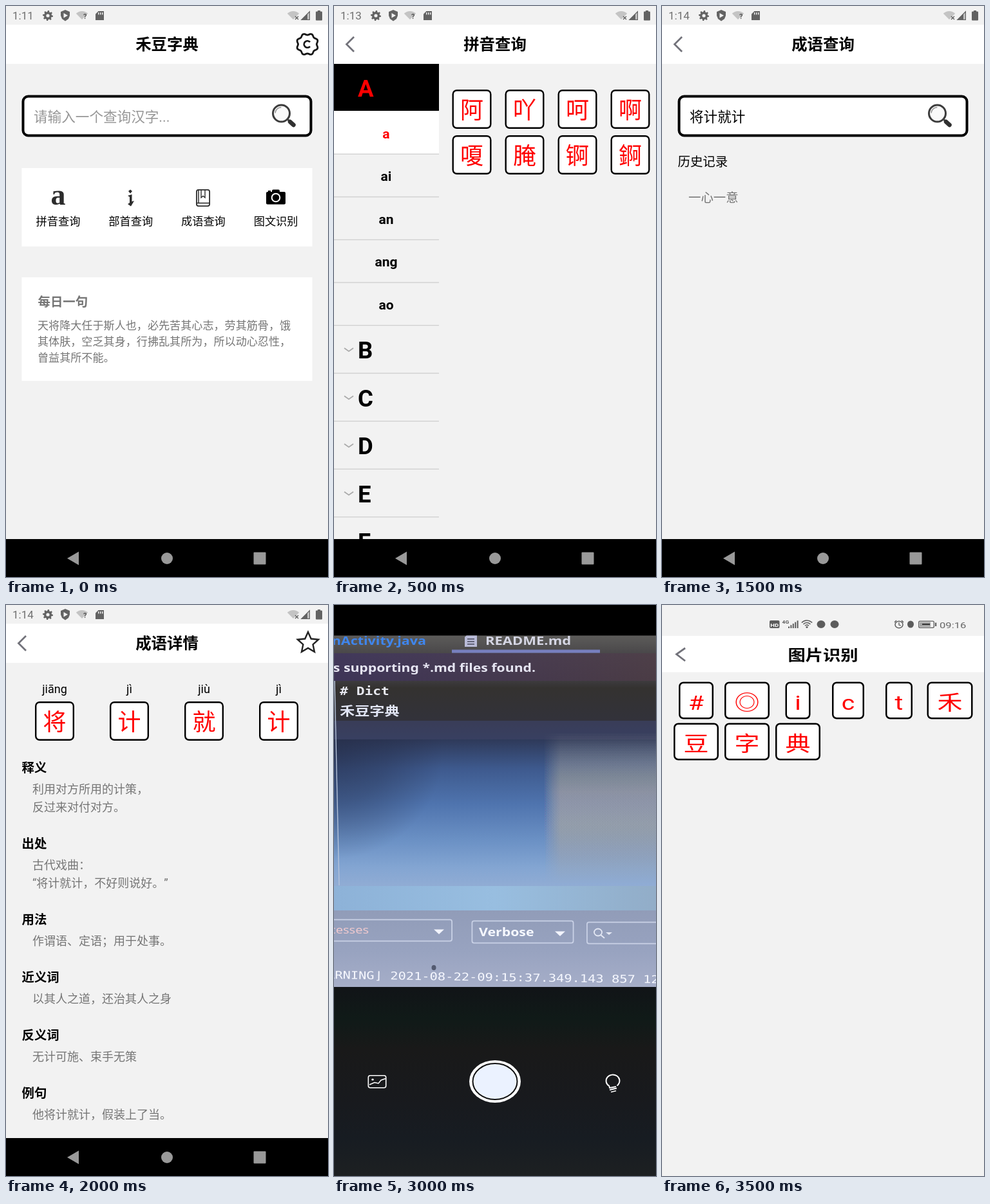
These frames come from a looping animation (500x888 px, 4000 ms). An HTML page with a canvas:

```html
<!DOCTYPE html>
<html lang="zh-CN">
<head>
<meta charset="utf-8">
<title>禾豆字典</title>
<style>
  html, body { margin: 0; width: 100%; height: 100%; overflow: hidden; background: #f2f2f2; }
  canvas { display: block; width: 500px; height: 888px; }
</style>
</head>
<body>
<canvas id="stage" width="500" height="888"></canvas>
<script>
const ctx = document.getElementById('stage').getContext('2d');
const SANS = 'Roboto, "Noto Sans CJK SC", "Noto Sans CJK", sans-serif';
const UI = '"Noto Sans", "Open Sans", "Noto Sans CJK SC", sans-serif';
const MONO = '"DejaVu Sans Mono", "Noto Sans CJK SC", monospace';
const SERIF = '"Liberation Serif", serif';
const PAGE = '#f2f2f2', RED = '#ff0000', INK = '#000', STEP = 500;
const APP = '禾豆字典';
let squash = 1; // the tall phone's screens are shown flattened

function text(str, x, y, size, color, { align = 'left', weight = 400, family = SANS, turn = 0 } = {}) {
  ctx.save();
  ctx.translate(x, y);
  ctx.rotate(turn);
  ctx.scale(1, squash);
  ctx.font = `${weight} ${size}px ${family}`;
  ctx.textAlign = align;
  ctx.fillStyle = color;
  ctx.fillText(str, 0, 0);
  ctx.restore();
}

function rect(x, y, w, h, color) {
  ctx.fillStyle = color;
  ctx.fillRect(x, y, w, h);
}

function line(points, color, width, close = false) {
  ctx.beginPath();
  points.forEach(([x, y]) => ctx.lineTo(x, y));
  if (close) ctx.closePath();
  ctx.strokeStyle = color;
  ctx.lineWidth = width;
  ctx.stroke();
}

function poly(points, color) {
  ctx.beginPath();
  points.forEach(([x, y]) => ctx.lineTo(x, y));
  ctx.fillStyle = color;
  ctx.fill();
}

function oval(x, y, rx, ry, fill, stroke, width) {
  ctx.beginPath();
  ctx.ellipse(x, y, rx, ry, 0, 0, 7);
  if (fill) { ctx.fillStyle = fill; ctx.fill(); }
  if (stroke) { ctx.strokeStyle = stroke; ctx.lineWidth = width; ctx.stroke(); }
}

function arc(x, y, r, from, to, color, width, ry = r) {
  ctx.beginPath();
  ctx.ellipse(x, y, r, ry, 0, from, to);
  ctx.strokeStyle = color;
  ctx.lineWidth = width;
  ctx.stroke();
}

function box(x, y, w, h, r, fill, stroke, width = 0) {
  const d = width / 2;
  ctx.beginPath();
  ctx.roundRect(x + d, y + d, w - width, h - width, r);
  if (fill) { ctx.fillStyle = fill; ctx.fill(); }
  if (stroke) { ctx.strokeStyle = stroke; ctx.lineWidth = width; ctx.stroke(); }
}

function fade(x0, y0, x1, y1, stops) {
  const g = ctx.createLinearGradient(x0, y0, x1, y1);
  stops.forEach(([at, color]) => g.addColorStop(at, color));
  return g;
}

function glow(x, y, r, rgb, alpha) {
  const g = ctx.createRadialGradient(x, y, 0, x, y, r);
  g.addColorStop(0, `rgba(${rgb},${alpha})`);
  g.addColorStop(0.5, `rgba(${rgb},${alpha * 0.6})`);
  g.addColorStop(1, `rgba(${rgb},0)`);
  return g;
}

function radial(x, y, n, radius) {
  return Array.from({ length: n }, (_, i) => {
    const a = i / n * Math.PI * 2 - Math.PI / 2, r = radius(i, a);
    return [x + r * Math.cos(a), y + r * Math.sin(a)];
  });
}

function fan(x, y, r, color) {
  ctx.beginPath();
  ctx.moveTo(x, y);
  ctx.arc(x, y, r, -Math.PI * 0.75, -Math.PI * 0.25);
  ctx.fillStyle = color;
  ctx.fill();
}

function statusBar(clock) {
  const c = '#636363', pale = '#c4c4c4';
  text(clock, 10, 21, 17, '#707070');
  poly(radial(65, 15, 48, i => i % 6 < 3 ? 8 : 6), c);
  oval(65, 15, 2.6, 2.6, PAGE);
  poly([[92, 6], [99, 9], [99, 15], [97, 20], [92, 23.5], [87, 20], [85, 15], [85, 9]], c);
  poly([[89.5, 11], [96, 14.8], [89.5, 18.5]], PAGE);
  fan(118, 21, 13, pale);
  text('?', 120, 20, 11, '#555', { weight: 700 });
  poly([[143.5, 8], [152, 8], [152, 22], [139, 22], [139, 12.5]], c);
  [143, 146, 149].forEach(x => rect(x, 10, 1.4, 3.5, PAGE));
  fan(446, 21, 13, pale);
  line([[449, 16], [454, 21]], c, 1.4);
  line([[454, 16], [449, 21]], c, 1.4);
  poly([[458, 22], [472, 8], [472, 22]], pale);
  poly([[458, 22], [468, 12], [468, 22]], c);
  line([[458.8, 21.4], [471.4, 8.8], [471.4, 21.4]], c, 1.2, true);
  rect(484, 7, 4, 2, c);
  box(481, 8.5, 10, 14, 1, c);
}

function navBar() {
  rect(0, 829, 500, 59, '#000');
  poly([[95, 859], [113, 848.5], [113, 869.5]], '#999');
  oval(250, 859, 9, 9, '#999');
  box(384.5, 849.5, 19, 19, 1, '#999');
}

function page(title, clock, back = true) {
  rect(0, 0, 500, 888, PAGE);
  rect(0, 29, 500, 61, '#fff');
  statusBar(clock);
  text(title, 250, 68, 24.4, INK, { align: 'center', weight: 700 });
  if (back) line([[31, 48], [19.5, 59.5], [31, 71]], '#72727a', 2.8);
}

function searchBox(value, color) {
  box(24.5, 138.5, 451, 65, 8, '#fff', INK, 4);
  text(value, 43, 180, 21.6, color);
  oval(427.5, 167, 13, 13, '#fafafa', '#3c3c3c', 3);
  arc(427.5, 167, 9.5, 3.2, 4.7, '#999', 1.5);
  ctx.lineCap = 'round';
  line([[437, 176], [440, 179]], '#444', 3);
  line([[441, 180], [446.5, 185]], '#303030', 6.5);
  ctx.lineCap = 'butt';
}

function tile(char, x, y) {
  box(x, y, 61, 61, 6, '#fff', INK, 2.4);
  text(char, x + 30.5, y + 44.5, 36, RED, { align: 'center' });
}

function tiles(chars) {
  [...chars].forEach((c, i) => tile(c, 183.5 + i % 4 * 82, 130 + Math.floor(i / 4) * 71));
}

function home() {
  page(APP, '1:11', false);
  line(radial(468, 59.5, 96, (i, a) => 15.7 + 1.3 * Math.cos(8 * a + Math.PI)), '#161616', 2.8, true);
  arc(468, 59.5, 5.2, 0.7, 5.6, '#161616', 2.8);
  searchBox('请输入一个查询汉字...', '#969696');

  rect(24.5, 252, 451, 122, '#fff');
  ['拼音查询', '部首查询', '成语查询', '图文识别'].forEach((label, i) =>
    text(label, 81 + i * 112.7, 341, 17.2, INK, { align: 'center' }));
  const c = '#2c2c2c';
  text('a', 81, 309, 46, c, { align: 'center', weight: 700, family: SERIF });
  poly([[190, 288], [193, 285.5], [196, 288], [193, 291.5]], c);
  poly([[189, 295], [195.5, 293], [195.5, 304], [199, 303], [194, 311.5], [189, 308], [192, 306], [192, 297]], c);
  box(295, 285, 22, 27, 3, null, c, 1.8);
  line([[296, 306.5], [316, 306.5]], c, 1.6);
  line([[299, 286], [299, 306]], c, 1.5);
  line([[303, 286], [303, 298], [306, 295.5], [309, 298], [309, 286]], c, 1.4);
  box(404, 289, 30, 19.5, 2, INK);
  box(413, 285.5, 12, 6, 2, INK);
  rect(407, 287, 4, 2, INK);
  oval(419, 298, 6.3, 6.3, INK, '#fff', 2);

  rect(24.5, 422, 451, 161, '#fff');
  text('每日一句', 49.5, 467, 19.4, '#757575', { weight: 700 });
  ['天将降大任于斯人也，必先苦其心志，劳其筋骨，饿',
   '其体肤，空乏其身，行拂乱其所为，所以动心忍性，',
   '曾益其所不能。'].forEach((row, i) => text(row, 49, 503 + i * 25, 17.1, '#757575'));
  navBar();
}

function sidebar(head, items, more) {
  rect(0, 90, 163, 73, '#000');
  text(head, 37, 140.5, 36.5, RED, { weight: 700 });
  rect(0, 163, 163, 67, '#fff');
  let y = 163;
  items.forEach((item, i) => {
    text(item, 81, y + 42.5, 21, i ? INK : RED, { align: 'center', weight: 700 });
    y += 66.6;
    rect(0, y, 163, 1.3, '#cfcfcf');
  });
  for (const name of more) {
    line([[16, y + 36], [23, y + 41], [30, y + 36]], '#aaa', 1.8);
    text(name, 37, y + 52, 36.5, INK, { weight: 700 });
    y += 74.5;
    rect(0, y, 163, 1.3, '#cfcfcf');
  }
}

function pinyin() {
  page('拼音查询', '1:13');
  sidebar('A', ['a', 'ai', 'an', 'ang', 'ao'], 'BCDEF');
  tiles('阿吖呵啊嗄腌锕錒');
  navBar();
}

function radicals() {
  page('部首查询', '1:13');
  sidebar('1', [...'一丨丶丿乙'], '23456');
  tiles('一丁七万丈三上下不与丐丑专且丕世丘丙业丛东丝丞丢两严');
  navBar();
}

function idiomSearch() {
  page('成语查询', '1:14');
  searchBox('将计就计', INK);
  text('历史记录', 24.5, 249, 19.4, INK);
  text('一心一意', 41, 305, 19.4, '#757575');
  navBar();
}

function idiomDetail() {
  page('成语详情', '1:14');
  line(radial(469, 59, 10, i => i % 2 ? 8 : 17), '#222', 2.4, true);
  [...'将计就计'].forEach((c, i) => tile(c, 45 + i * 116, 150));
  ['jiāng', 'jì', 'jiù', 'jì'].forEach((p, i) =>
    text(p, 75.5 + i * 116, 137, 18, INK, { align: 'center' }));
  let y = 260;
  [['释义', '利用对方所用的计策，', '反过来对付对方。'],
   ['出处', '古代戏曲：', '“将计就计，不好则说好。”'],
   ['用法', '作谓语、定语；用于处事。'],
   ['近义词', '以其人之道，还治其人之身'],
   ['反义词', '无计可施、束手无策'],
   ['例句', '他将计就计，假装上了当。']].forEach(([head, ...rows]) => {
    text(head, 24.5, y, 19.4, INK, { weight: 700 });
    rows.forEach((row, i) => text(row, 41, y + 33 + i * 28, 18, '#757575'));
    y += 62 + rows.length * 28;
  });
  navBar();
}

function panel() {
  rect(0, 594, 500, 294, fade(0, 594, 0, 888, [
    [0, '#111417'], [0.17, '#101a18'], [0.33, '#191919'], [0.62, '#181a1e'], [0.8, '#171c22'], [1, '#1d2022']]));
}

function photo(draw) {
  squash = 0.82;
  rect(0, 0, 500, 888, '#000');
  ctx.save();
  ctx.beginPath();
  ctx.rect(0, 47.5, 500, 546.5);
  ctx.clip();
  draw();
  ctx.restore();
  panel();
}

// pale reflection with a soft upright left edge
function reflection(x, top, bottom, rgb, alpha) {
  for (let i = 0; i < 24; i++) {
    const a = alpha / 24 * 1.6;
    const inset = i * (bottom - top) / 60;
    rect(x, top + inset, 500 - x, bottom - top - inset * 2,
      fade(x, 0, x + 45, 0, [[0, `rgba(${rgb},0)`], [0.6, `rgba(${rgb},${a})`], [1, `rgba(${rgb},${a})`]]));
  }
}

const arrow = (x, y, color) => poly([[x - 8, y - 3.5], [x + 8, y - 3.5], [x, y + 4]], color);

function cropPhoto() {
  const bold = { family: UI, weight: 600 }, code = { family: MONO, weight: 700 };
  rect(0, 47, 500, 547, fade(0, 47, 0, 594, [
    [0, '#3a3432'], [0.14, '#383638'], [0.22, '#121722'], [0.28, '#1d2639'], [0.33, '#2f3f5c'], [0.4, '#41608c'],
    [0.5, '#5c83b8'], [0.58, '#7795c6'], [0.66, '#8fa0cd'], [0.75, '#a7b1da'], [0.755, '#b0bce6'], [0.82, '#b4bee4'], [1, '#9a9da4']]));
  rect(99, 223, 31, 234, 'rgba(142,150,185,.3)');
  rect(130, 223, 80, 234, fade(130, 0, 210, 0, [[0, 'rgba(120,125,165,.25)'], [1, 'rgba(120,125,165,0)']]));
  reflection(322, 225, 420, '176,168,160', 0.6);
  rect(48, 127, 452, 38, '#2a50b0');
  rect(99, 195, 302, 28, 'rgba(64,80,122,.6)');
  line([[128, 165], [131, 457]], '#b9c1da', 1.3);

  // everything outside the crop window is dimmed
  ctx.beginPath();
  ctx.rect(0, 47, 500, 547);
  ctx.rect(99, 156, 302, 330);
  ctx.fillStyle = 'rgba(17,16,15,.8)';
  ctx.fill('evenodd');
  rect(0, 165, 48, 73, '#111722');
  rect(0, 238, 48, 28, '#2c251d');
  rect(48, 127, 452, 29, '#151d48');
  rect(301, 90, 199, 32, '#1e1d25');
  rect(301, 121, 199, 5, '#2c4380');

  rect(11, 105, 22, 3, '#999');
  oval(73, 107, 12, 11, '#1b4f80');
  text('C', 73, 112, 14, '#10212f', { ...bold, align: 'center' });
  text('MainActivity.java', 94, 113, 19.7, '#345591', bold);
  for (const x of [281, 493]) {
    line([[x - 6, 101], [x + 6, 111]], '#484848', 1.6);
    line([[x + 6, 101], [x - 6, 111]], '#484848', 1.6);
  }
  poly([[324, 97], [338, 97], [338, 117], [318, 117], [318, 103]], '#62626c');
  [103, 107, 111].forEach(y => rect(323, y, 10, 1.5, '#24242a'));
  text('README.md', 349, 114, 21, '#7c7c82', bold);
  text('Plugins supporting *.md files found.', 63, 153, 20.9, '#77778a', { family: UI, weight: 500 });
  rect(30, 127, 13, 36, '#33363c');

  text('1', 56, 187, 18, '#3f424a', code);
  text('2', 56, 214, 18, '#777', code);
  text('3', 56, 242, 18, '#3f424a', code);
  text('# Dict', 137, 187, 20, '#f4f4fa', code);
  oval(161, 179.5, 10, 8, '#f7c552');
  rect(156, 185, 10, 7, '#dfa842');
  text(APP, 136, 216, 21.7, '#fff', { weight: 500 });
  rect(222, 198, 2.5, 23, '#fff');
  line([[335, 201], [345, 201]], '#efd5d2', 2);
  line([[340, 201], [340, 219]], '#efd5d2', 2);
  line([[335, 219], [345, 219]], '#efd5d2', 2);

  const faint = '#434345';
  box(-10, 502, 303, 36, 3, null, '#343436', 2);
  box(319, 510, 148, 32, 3, null, '#3c3c3e', 2);
  box(484, 513, 40, 30, 3, null, '#3c3c3e', 2);
  text('uggable processes', 0, 525, 20, faint, { family: UI, turn: 0.008 });
  text('Verbose', 331, 531, 20, '#4c4c4e', bold);
  arrow(274, 523, '#4c4c4e');
  arrow(447, 526, '#4c4c4e');
  text('D/FaceStory: ChangeContLowLight(2015)::"clas', 0, 586, 18.7, faint, { family: MONO, turn: 0.015 });
}

function crop() {
  photo(cropPhoto);
  ctx.strokeStyle = '#fff';
  ctx.lineWidth = 1.2;
  ctx.strokeRect(99.5, 156.5, 301, 329);
  for (const [x, sx] of [[99.5, 1], [400.5, -1]])
    for (const [y, sy] of [[156.5, 1], [485.5, -1]])
      line([[x + sx * 24, y], [x, y], [x, y + sy * 20]], '#fff', 3.4);

  line([[56.5, 732.5], [77, 750]], '#fff', 2.4);
  line([[77, 732.5], [56.5, 750]], '#fff', 2.4);
  line([[417.5, 740], [428, 749], [449.5, 732.5]], '#fff', 3);
  arc(249, 741, 14.5, 0.75, 6.1, '#fff', 1.9, 12);
  line([[258, 738], [263, 742], [266.5, 737]], '#fff', 1.9);
  box(241.5, 735, 15, 12, 1, null, '#fff', 1.6);
  line([[243, 744], [247, 740.5], [250, 743], [255, 738]], '#fff', 1.4);
}

function cameraPhoto() {
  const bold = { family: UI, weight: 600 };
  const right = { ...bold, align: 'right' };
  rect(0, 47, 500, 547, fade(0, 47, 0, 594, [
    [0, '#5d5c5a'], [0.05, '#4a484a'], [0.13, '#3d3b3e'], [0.15, '#343230'], [0.24, '#32323a'], [0.3, '#2f3b5c'],
    [0.38, '#3e5a8e'], [0.48, '#4f74ae'], [0.58, '#6a90c4'], [0.66, '#83a5d2'], [0.71, '#90acd4'],
    [0.78, '#919cb8'], [0.9, '#98a3c0'], [1, '#a6aec8']]));
  rect(0, 75, 500, 43, fade(0, 0, 500, 0, [[0, 'rgba(62,50,98,.7)'], [1, 'rgba(80,60,72,.7)']]));
  rect(0, 180, 500, 29, 'rgba(60,66,100,.7)');
  rect(0, 209, 170, 228, glow(0, 225, 170, '35,42,68', 0.6));
  reflection(325, 200, 432, '180,172,158', 0.6);
  rect(0, 437, 500, 38, fade(0, 0, 500, 0, [[0, '#8db2d8'], [0.5, '#98bee0'], [1, '#92adc8']]));
  line([[1, 118], [8, 436]], '#b4c2da', 1.4);

  text('MainActivity.java', 143, 62, 21.5, '#3f86ee', right);
  poly([[209, 44], [222, 44], [222, 65], [203, 65], [203, 50]], '#b9bbd8');
  [52, 56, 60].forEach(y => rect(207, y, 11, 1.7, '#55566a'));
  text('README.md', 235, 62, 22, '#d5d6e4', bold);
  rect(183, 69.5, 230, 5, '#777fbf');
  text('Plugins supporting *.md files found.', 313, 104, 21.2, '#e6e5f2', right);
  text('# Dict', 9, 140, 21.3, '#e9eaf2', { family: MONO, weight: 700 });
  text(APP, 9, 172, 23.2, '#e2e6f6', { weight: 700 });

  const rim = '#c9d1e6';
  box(-10, 488.5, 194, 35, 3, null, rim, 1.8);
  box(213.5, 490.5, 159, 36, 3, null, rim, 1.8);
  box(392, 492.5, 130, 35, 3, null, rim, 1.8);
  text('Debuggable processes', 54, 511, 20, '#efc9ce', { ...right, weight: 400 });
  text('Verbose', 225, 515, 21.3, '#f6f8ff', bold);
  arrow(163, 508, '#f2f4fc');
  arrow(351, 511, '#f2f4fc');
  oval(410, 509, 6, 5.5, null, '#e4e8f4', 1.8);
  line([[414, 513], [420, 518]], '#e4e8f4', 2);
  poly([[422, 509], [432, 509], [427, 513]], '#e4e8f4');
  text('ARNING⌋ 2021-08-22-09:15:37.349.143 857 12', -11, 581, 20.4, '#f6f8ff', { family: MONO, turn: 0.014 });
  oval(155, 564, 3.5, 4, '#535a70');
}

function camera() {
  photo(cameraPhoto);
  oval(250, 741, 40, 33, '#fff');
  oval(250, 741, 34.5, 28, '#ebf2ff', '#111', 2);
  box(52.5, 731, 29, 20.5, 3, null, '#fff', 1.6);
  oval(60, 738, 1.8, 1.6, '#fff');
  line([[55, 746], [63, 742.5], [69, 744], [73, 739], [80, 736.5]], '#fff', 1.5);
  arc(433, 740, 10.5, 2.2, 7.2, '#fff', 1.9, 9.5);
  line([[427, 747], [428, 751], [438, 749]], '#fff', 1.8);
  line([[428, 754], [439, 751.5]], '#fff', 1.8);
  line([[430, 757.5], [438, 755.5]], '#fff', 1.8);
}

function phoneStatus() {
  const c = '#5c5c5c';
  box(167, 24, 15.5, 12, 2, c);
  text('HD', 174.7, 33.5, 9.5, '#fff', { align: 'center', weight: 700 });
  text('4G', 186.5, 28.5, 8.5, c, { weight: 700 });
  for (let i = 0; i < 5; i++) rect(196 + i * 3.4, 33.5 - i * 2.3, 2, 2.5 + i * 2.3, c);
  [4, 7.5, 11].forEach(r => arc(225, 35, r, -2.4, -0.75, c, 1.6));
  oval(225, 34.5, 1.6, 1.4, c);
  oval(247, 30, 6.5, 6, c);
  oval(268, 30, 6.5, 6, c);
  oval(368, 30.5, 6, 5.3, null, c, 1.5);
  line([[368, 27], [368, 31], [371, 32]], c, 1.3);
  line([[361, 27], [364, 24]], c, 1.5);
  line([[372, 24], [375, 27]], c, 1.5);
  oval(386, 30, 5, 5.5, c);
  box(398, 24.5, 25, 11.5, 2, null, c, 1.3);
  rect(400, 26.5, 17, 7.5, '#a5a5a5');
  line([[404, 30], [416, 30]], '#333', 2);
  rect(424, 27.5, 2.2, 5.5, c);
  text('09:16', 431, 36, 16.6, '#666');
}

function result() {
  squash = 0.82;
  rect(0, 0, 500, 888, PAGE);
  rect(0, 48, 500, 56.5, '#fff');
  phoneStatus();
  text('图片识别', 250, 85.5, 27.3, INK, { align: 'center', weight: 700 });
  line([[36, 67], [22.5, 76.5], [36, 87]], '#72727a', 2.8);
  const [first, second, ...rest] = APP;
  [['#', 26, 54], ['◎', 97, 70], ['i', 191.5, 39], ['c', 264, 50], ['t', 347, 42], [first, 411.5, 71],
   ...[second, ...rest].map((c, i) => [c, 18 + i * 79, 70, 64])
  ].forEach(([char, x, w, drop = 0]) => {
    box(x, 119.5 + drop, w, 58, 6, '#fff', INK, 2.5);
    text(char, x + w / 2, 162.5 + drop, 39, RED, { align: 'center' });
  });
}

const scenes = [home, pinyin, radicals, idiomSearch, idiomDetail, crop, camera, result];

function frame(now) {
  squash = 1;
  scenes[Math.floor(now / STEP) % scenes.length]();
  requestAnimationFrame(frame);
}
frame(0);
</script>
</body>
</html>
```
